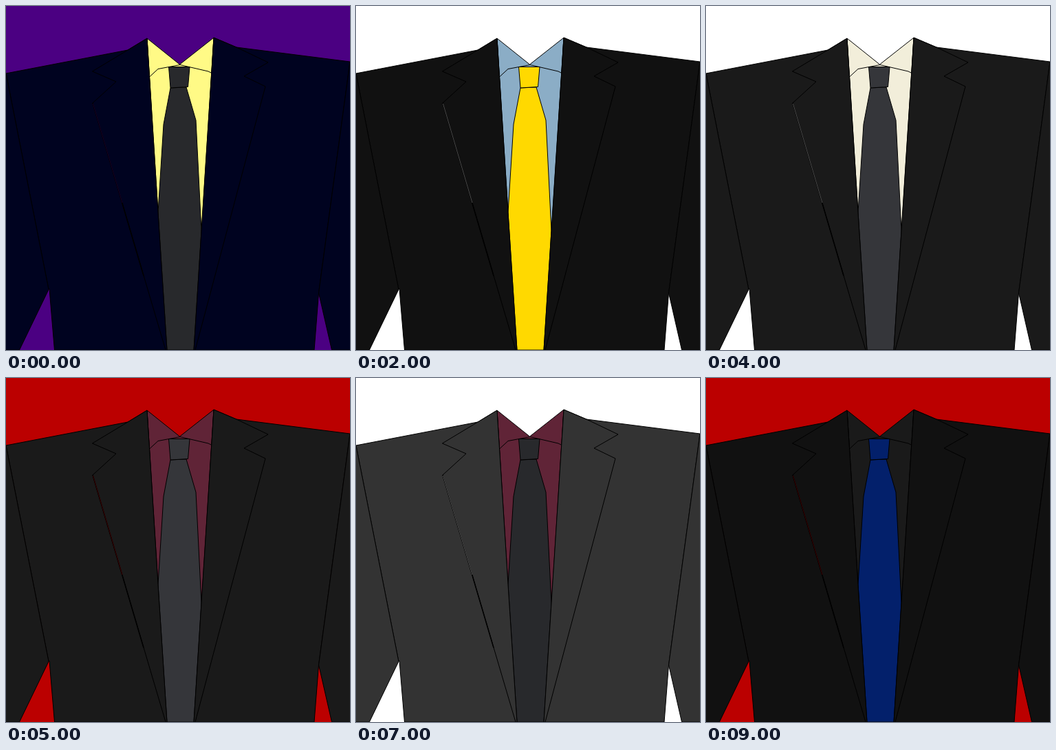
Recreate the animation shown at these times as an HTML page. Size 500 px wide and 500 px high, loop 10 s.

```html
<!DOCTYPE html>
<html lang="en">
<head>
<meta charset="utf-8">
<title>Suits</title>
<style>
  html, body { margin: 0; width: 100%; height: 100%; overflow: hidden; }
  svg { display: block; width: 100%; height: 100%; background: var(--back); }
  path { stroke: #000; stroke-width: 1; fill: none; }
  .shirt { fill: var(--shirt); }
  .tie { fill: var(--tie); }
  .suit { fill: var(--suit); }
  .seam { stroke-width: 1.5; }
  .gap { stroke: var(--back); stroke-width: .5; opacity: .6; }
</style>
</head>
<body>
<svg viewBox="0 0 500 500">
  <path class="shirt" d="M205 47 252.500 85 302 46 284 330 273 500H233L221 300Z"/>
  <path d="M208 103.500 221 91.500 253 85.500 294 95 298 97"/>
  <path class="tie" d="M239 119 262 118 276 166 284 327 273 500H234L221 300 229 172Z"/>
  <path class="tie" d="M236.500 88.500H267L264.500 117.500 239 119Z"/>

  <path class="suit" d="M0 98 177 64 205 47 232 500H70.500L63 411 62 412Z"/>
  <path class="suit" d="M500 81 335 60 302 46 275 500H448L454.500 417Z"/>
  <path class="suit" d="M0 98 62 412 19.500 500H-2V98Z"/>
  <path class="suit" d="M500 81 454.500 417 473.500 500H502V81Z"/>

  <path class="suit" d="M205 47 177 64 125.500 95 160 110 126 141 232 500H234L221 300Z"/>
  <path class="suit" d="M302 46 335 60 381 82 346 102 377 117 275 500H273L284 327Z"/>
  <path class="seam" d="M126 141 200 392"/>
  <path class="gap" d="M126.500 142 169 286"/>
</svg>
<script>
  const parts = ['back', 'suit', 'shirt', 'tie'];
  const outfits = [
    ['#4b0082', '#000320', '#fffa86', '#28292c'],
    ['#4b0082', '#1a1a1a', '#f2eeda', '#28292c'],
    ['#ffffff', '#111111', '#8badc6', '#ffd900'],
    ['#bb0000', '#333333', '#f54c7b', '#ffd900'],
    ['#ffffff', '#1a1a1a', '#f2eeda', '#35363a'],
    ['#bb0000', '#1a1a1a', '#602437', '#35363a'],
    ['#0000ff', '#1a1a1a', '#602437', '#35373a'],
    ['#ffffff', '#333333', '#602437', '#28292c'],
    ['#ffffff', '#aaaaaa', '#602437', '#27292c'],
    ['#bb0000', '#111111', '#1a1a1a', '#03206b']
  ];
  const start = performance.now();

  function draw(now) {
    const step = Math.floor(Math.max(0, now - start) / 1000) % outfits.length;
    parts.forEach((part, i) =>
      document.documentElement.style.setProperty('--' + part, outfits[step][i]));
    requestAnimationFrame(draw);
  }
  draw(start);
</script>
</body>
</html>
```
